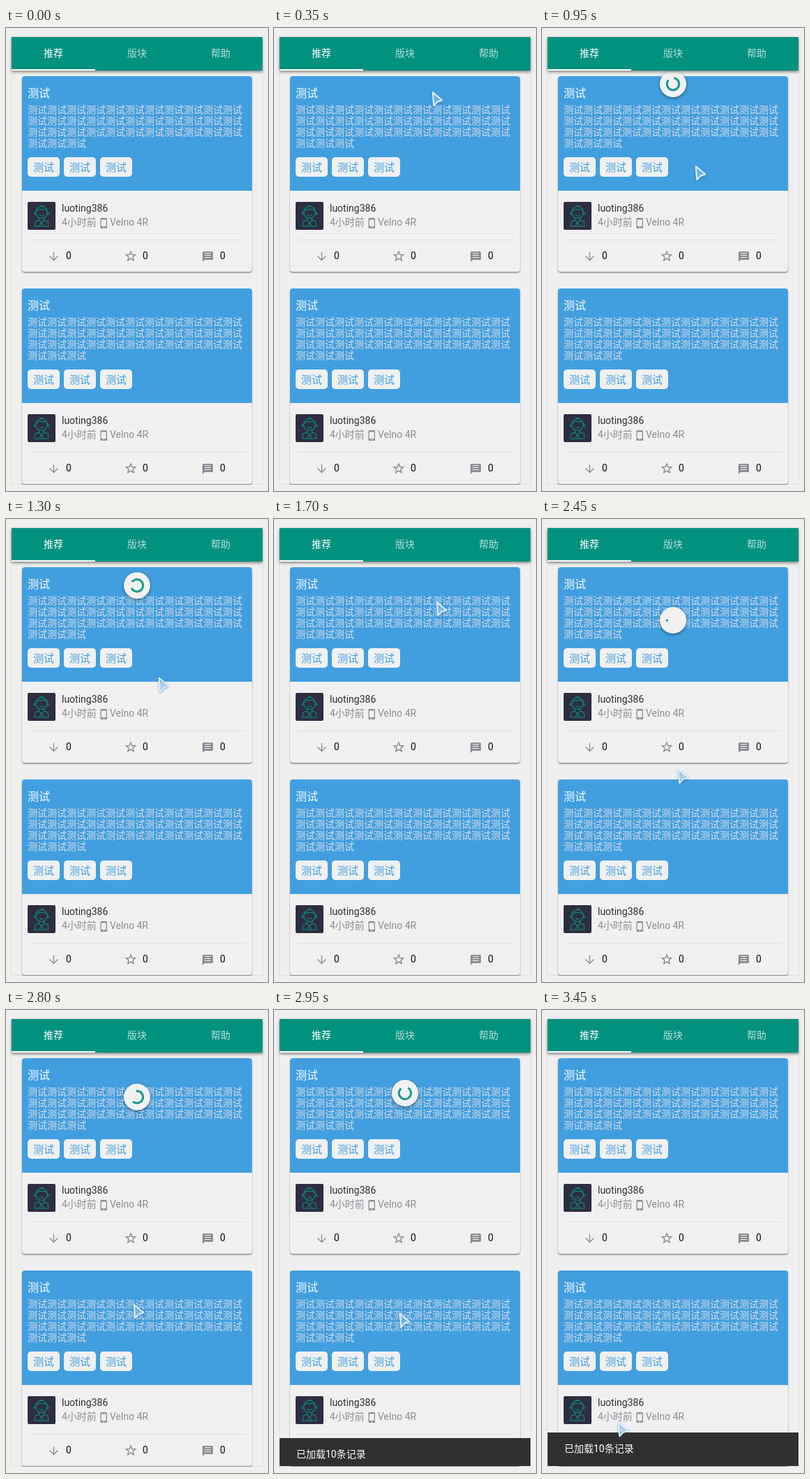
Animation, 376 px wide and 663 px high, one loop 3500 ms. Source, as an HTML page with a canvas:

```html
<!DOCTYPE html>
<html lang="zh-CN">
<head>
<meta charset="utf-8">
<style>
html, body { margin: 0; width: 100%; height: 100%; overflow: hidden; background: #efefef; }
canvas { display: block; }
</style>
</head>
<body>
<canvas id="stage" width="376" height="663"></canvas>
<script>
const ctx = document.getElementById('stage').getContext('2d');
const LOOP = 3500, STEP = 50, TAU = Math.PI * 2;
const TEAL = '#00917f', BLUE = '#419fe0', PAPER = '#f0f0f0', GRAY = '#8e8b93';
const FAMILY = 'Roboto, "Noto Sans CJK SC", "Noto Sans CJK", sans-serif';

// Pointer path: time, x, y of its top left corner
const POINTER = [
  [50, 323, 258], [350, 226, 91], [650, 226, 91], [950, 219, 197],
  [1250, 216, 240], [1700, 232, 118], [1750, 231, 115], [2050, 215, 244],
  [2300, 204, 318], [2450, 194, 358], [2700, 184, 412], [2950, 179, 434],
  [3200, 189, 405], [3300, 189, 405], [3450, 108, 590]
];

const clamp = v => Math.max(0, Math.min(1, v));
const span = (t, from, to) => clamp((t - from) / (to - from));
const mix = (a, b, p) => a + (b - a) * p;
const smooth = p => p * p * (3 - 2 * p);
const rad = deg => deg * Math.PI / 180;

function pointerAt(t) {
  let i = 1;
  while (i < POINTER.length - 1 && POINTER[i][0] < t) i++;
  const [t0, x0, y0] = POINTER[i - 1], [t1, x1, y1] = POINTER[i];
  const p = span(t, t0, t1);
  return { x: mix(x0, x1, p), y: mix(y0, y1, p) };
}

function text(str, x, y, size, color, { weight = 400, align = 'left' } = {}) {
  ctx.font = `${weight} ${size}px ${FAMILY}`;
  ctx.textAlign = align;
  ctx.fillStyle = color;
  ctx.fillText(str, x, y);
}

function box(x, y, w, h, r, color) {
  ctx.fillStyle = color;
  ctx.beginPath();
  ctx.roundRect(x, y, w, h, r);
  ctx.fill();
}

function line(points, close = false) {
  ctx.beginPath();
  points.forEach(([x, y]) => ctx.lineTo(x, y));
  if (close) ctx.closePath();
}

function arc(x, y, r, from = 0, to = TAU) {
  ctx.beginPath();
  ctx.arc(x, y, r, from, to);
}

function withShadow(blur, dy, color, draw) {
  ctx.save();
  ctx.shadowBlur = blur;
  ctx.shadowOffsetY = dy;
  ctx.shadowColor = color;
  draw();
  ctx.restore();
}

function at(x, y, draw) {
  ctx.save();
  ctx.translate(x, y);
  draw();
  ctx.restore();
}

function avatar() {
  box(0, 0, 40, 40, 2, '#2f2d40');
  ctx.strokeStyle = '#078f7c';
  ctx.lineWidth = 1.1;
  arc(20, 15, 8.5);
  ctx.stroke();
  ctx.beginPath();
  ctx.moveTo(12, 14);
  ctx.quadraticCurveTo(16, 9, 20, 11);
  ctx.quadraticCurveTo(25, 9, 28, 14);
  ctx.moveTo(17, 7);
  ctx.quadraticCurveTo(20, 4, 23, 6);
  ctx.stroke();
  for (const side of [-1, 1]) {
    arc(20 + side * 9.5, 16.5, 1.5);
    ctx.stroke();
    line([[20 + side * 3, 23], [20 + side * 4, 26], [20 + side * 9, 28], [20 + side * 10, 35]]);
    ctx.stroke();
    line([[20 + side * 4, 26], [20, 30], [20 + side * 3, 34]]);
    ctx.stroke();
  }
  arc(20, 17, 3, rad(20), rad(160));
  ctx.stroke();
  line([[10, 35], [30, 35]]);
  ctx.stroke();
}

function phoneIcon() {
  box(0, 0, 9.5, 15, 1.5, GRAY);
  ctx.fillStyle = PAPER;
  ctx.fillRect(1.3, 2.4, 6.9, 9.6);
  ctx.fillRect(3.5, 13, 2.5, 1);
}

function arrowIcon() {
  line([[0, -5.5], [0, 5.5]]);
  ctx.stroke();
  line([[-6, 0], [0, 6], [6, 0]]);
  ctx.stroke();
}

function starIcon() {
  const points = Array.from({ length: 10 }, (_, i) => {
    const a = rad(i * 36 - 90), r = i % 2 ? 3.1 : 7;
    return [Math.cos(a) * r, Math.sin(a) * r + .5];
  });
  line(points, true);
  ctx.stroke();
}

function messageIcon() {
  box(-7.5, -7, 15, 12, 1.5, GRAY);
  line([[-7.5, 3], [-7.5, 8], [-4, 4.5]], true);
  ctx.fill();
  ctx.fillStyle = PAPER;
  for (const y of [-5, -2, 1]) ctx.fillRect(-4.5, y, 9, 1);
}

function card() {
  withShadow(2, 1.5, 'rgba(0,0,0,.45)', () => box(0, 0, 330, 280, 4, PAPER));
  box(0, 0, 330, 164, [4, 4, 0, 0], BLUE);
  text('测试', 8, 30, 16, '#fff', { weight: 500 });
  [11, 11, 11, 3].forEach((n, i) =>
    text('测试'.repeat(n), 8, 53 + i * 16, 14, '#dddce4'));
  for (let i = 0; i < 3; i++) {
    box(8 + i * 52, 116, 46, 28, 5, PAPER);
    text('测试', 31 + i * 52, 135.5, 15, BLUE, { align: 'center' });
  }
  at(8, 180, avatar);
  text('luoting386', 57, 194, 14, '#303030');
  text('4小时前', 57, 214, 14, GRAY);
  at(112.5, 203, phoneIcon);
  text('Velno 4R', 126, 214, 14, GRAY);
  ctx.fillStyle = '#dfdfe4';
  ctx.fillRect(10, 234, 310, 1);
  ctx.strokeStyle = GRAY;
  ctx.lineWidth = 1.4;
  at(45.5, 257.5, arrowIcon);
  at(156, 257.5, starIcon);
  at(266.5, 258, messageIcon);
  for (const x of [63, 173, 284]) text('0', x, 262, 14, '#111');
}

function toolbar() {
  withShadow(4, 2, 'rgba(0,0,0,.45)', () => box(8, 13, 360, 48, 0, TEAL));
  ['推荐', '版块', '帮助'].forEach((name, i) =>
    text(name, 68 + i * 120, 41, 14, i ? 'rgba(255,255,255,.7)' : '#fff',
      { weight: 500, align: 'center' }));
  ctx.fillStyle = '#fff';
  ctx.fillRect(8, 59, 120, 2);
}

function spinner(t, pointer) {
  if (t < 700 || t >= 3200) return;
  let y, start, length, scale = 1;
  if (t < 2450) {
    // While dragging, the disc follows the pointer at half speed
    const pull = pointer.y - (t < 1750 ? 81 : 115);
    y = 21 + pull * .51;
    const gap = t < 1750 ? 60 : 85;
    start = (t < 1750 ? -110 + (pull - 116) * 10 : 90 + (pull - 129) * 10) + gap / 2;
    length = 360 - gap;
  } else {
    const p = span(t, 2450, 2950);
    y = mix(145, 119, smooth(p));
    start = 170 + 130 * (t - 2450) / 500;
    length = mix(18, 290, smooth(p));
    scale = 1 - smooth(span(t, 2980, 3200));
  }
  if (y < 40) return;
  at(188, y, () => {
    ctx.scale(scale, scale);
    withShadow(4, 1.5, 'rgba(0,0,0,.45)', () => {
      arc(0, 0, 19);
      ctx.fillStyle = '#f1f1f1';
      ctx.fill();
    });
    ctx.strokeStyle = '#13988a';
    ctx.lineWidth = 3;
    arc(0, 0, 8.7, rad(start), rad(start + length));
    ctx.stroke();
  });
}

function snackbar(t) {
  if (t < 2800) return;
  const rise = 48 * (1 - Math.pow(1 - span(t, 2800, 3250), 4.4));
  ctx.save();
  ctx.beginPath();
  ctx.rect(8, 600, 360, 53);
  ctx.clip();
  box(8, 653 - rise, 360, 48, 0, '#303030');
  text('已加载10条记录', 32, 681 - rise, 14, '#fff');
  ctx.restore();
}

function cursor({ x, y }) {
  at(x, y, () => {
    line([[2, 1.5], [15, 12.5], [8.5, 14.5], [3.5, 20]], true);
    ctx.lineJoin = 'round';
    withShadow(3, 1, 'rgba(30,90,150,.6)', () => {
      ctx.strokeStyle = '#edf6fd';
      ctx.lineWidth = 2.4;
      ctx.stroke();
    });
    ctx.fillStyle = 'rgba(140,198,238,.55)';
    ctx.fill();
  });
}

function draw(t) {
  const pointer = pointerAt(t);
  ctx.lineJoin = 'miter';
  ctx.fillStyle = '#efefef';
  ctx.fillRect(0, 0, 376, 663);
  ctx.strokeStyle = '#dfdfdf';
  ctx.lineWidth = 1;
  ctx.strokeRect(7.5, 12.5, 361, 641);
  ctx.save();
  ctx.beginPath();
  ctx.rect(8, 13, 360, 641);
  ctx.clip();
  at(23, 69, card);
  at(23, 373, card);
  ctx.restore();
  spinner(t, pointer);
  toolbar();
  snackbar(t);
  if (t >= 50) cursor(pointer);
}

let origin;
function tick(now) {
  origin ??= now;
  draw(Math.floor(((now - origin) % LOOP) / STEP) * STEP);
  requestAnimationFrame(tick);
}
requestAnimationFrame(tick);
</script>
</body>
</html>
```
